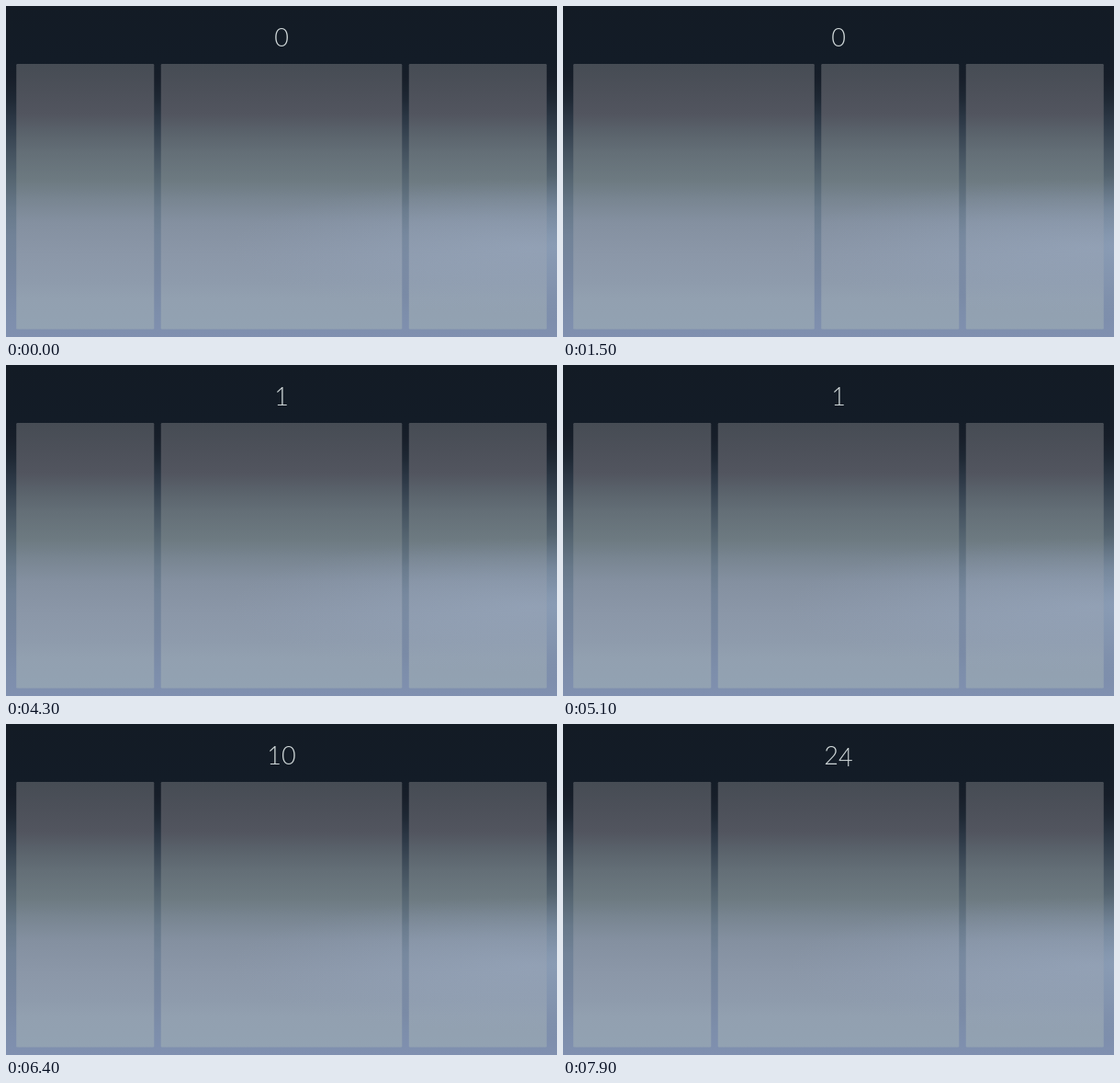
Animation, 600 px wide and 360 px high, one loop 8000 ms. Source, as an HTML page:

```html
<!DOCTYPE html>
<html lang="en">
<head>
<meta charset="utf-8">
<title>Panels and counter</title>
<style>
html, body { margin: 0; width: 100%; height: 100%; overflow: hidden; background: #131b25; }
svg { display: block; width: 100vw; height: 100vh; }
text { font: 300 27px Lato, "Open Sans", sans-serif; fill: #d0d8d9; text-anchor: middle; }
</style>
</head>
<body>
<svg viewBox="0 0 600 360">
  <defs>
    <radialGradient id="glow">
      <stop offset="0" stop-color="#a6bad6" stop-opacity=".6"/>
      <stop offset=".5" stop-color="#a0b4d0" stop-opacity=".36"/>
      <stop offset="1" stop-color="#98aac8" stop-opacity="0"/>
    </radialGradient>
  </defs>
  <rect width="600" height="360" fill="url(#sky)"/>
  <ellipse cx="605" cy="262" rx="230" ry="78" fill="url(#glow)" opacity=".75"/>
  <g id="panels" fill="url(#glass)"></g>
  <ellipse id="sheen" cx="575" cy="262" rx="330" ry="74" fill="url(#glow)" opacity=".5" clip-path="url(#panes)"/>
  <text id="count" x="300" y="44"></text>
</svg>
<script>
const NS = 'http://www.w3.org/2000/svg';
const LOOP = 8000;
const MARGIN = 11.25, GAP = 7.5, NARROW = 150, WIDE = 262.5;
const defs = document.querySelector('defs');
const panels = document.getElementById('panels');
const count = document.getElementById('count');

function add(parent, tag, attrs) {
  const el = document.createElementNS(NS, tag);
  for (const key in attrs) el.setAttribute(key, attrs[key]);
  return parent.appendChild(el);
}

function verticalGradient(id, stops) {
  const gradient = add(defs, 'linearGradient',
    { id, gradientUnits: 'userSpaceOnUse', x1: 0, y1: 0, x2: 0, y2: 360 });
  for (const [y, color] of stops) add(gradient, 'stop', { offset: y / 360, 'stop-color': color });
}

verticalGradient('sky', [
  [0, '#131b25'], [60, '#131c27'], [78, '#171e29'], [100, '#1e2733'],
  [130, '#303c4a'], [160, '#44525f'], [190, '#566672'], [220, '#677889'],
  [250, '#718297'], [300, '#7888a2'], [335, '#7d8eab'], [360, '#8090b0']
]);
verticalGradient('glass', [
  [63, '#464c54'], [90, '#4c5059'], [118, '#52555f'], [135, '#59616a'],
  [160, '#646f77'], [190, '#6d7a81'], [210, '#788591'], [235, '#8490a0'],
  [270, '#8b97a8'], [300, '#8e9bac'], [318, '#92a0b0'], [352, '#92a2b2']
]);

const clip = add(defs, 'clipPath', { id: 'panes' });
const shape = { y: 63, height: 288.5, rx: 1.2 };
const panes = [0, 1, 2].map(() => [add(panels, 'rect', shape), add(clip, 'rect', shape)]);

// [start time, index of the wide panel]
const layouts = [[0, 1], [700, 2], [1500, 0], [2400, 1]];

// [start time, first value, step, number of 100 ms ticks]
const runs = [
  [0, 0, 0, 1], [4300, 1, 1, 2], [4800, 0, 0, 1], [5100, 1, 1, 9],
  [6400, 10, 2, 5], [6900, 19, 1, 1], [7100, 20, 1, 1],
  [7300, 21, 1, 3], [7900, 24, 0, 1]
];

const latest = (list, t) => list.filter(item => item[0] <= t).pop();

function counterAt(t) {
  const [start, first, step, ticks] = latest(runs, t);
  return first + step * Math.min(ticks - 1, Math.floor((t - start) / 100));
}

// Old-style figures: some hang below the line, some rise above it.
const shift = digit => '34579'.includes(digit) ? 2 : '68'.includes(digit) ? -0.5 : 0;

function showCount(value) {
  const label = String(value);
  if (count.textContent === label) return;
  count.textContent = '';
  let last = 0;
  for (const digit of label) {
    add(count, 'tspan', { dy: shift(digit) - last }).textContent = digit;
    last = shift(digit);
  }
}

function render(t) {
  const wide = latest(layouts, t)[1];
  let x = MARGIN;
  panes.forEach((rects, i) => {
    const width = i === wide ? WIDE : NARROW;
    for (const rect of rects) {
      rect.setAttribute('x', x);
      rect.setAttribute('width', width);
    }
    x += width + GAP;
  });
  showCount(counterAt(t));
}

const begin = performance.now();
function frame() {
  render((performance.now() - begin) % LOOP);
  requestAnimationFrame(frame);
}
frame();
</script>
</body>
</html>
```
